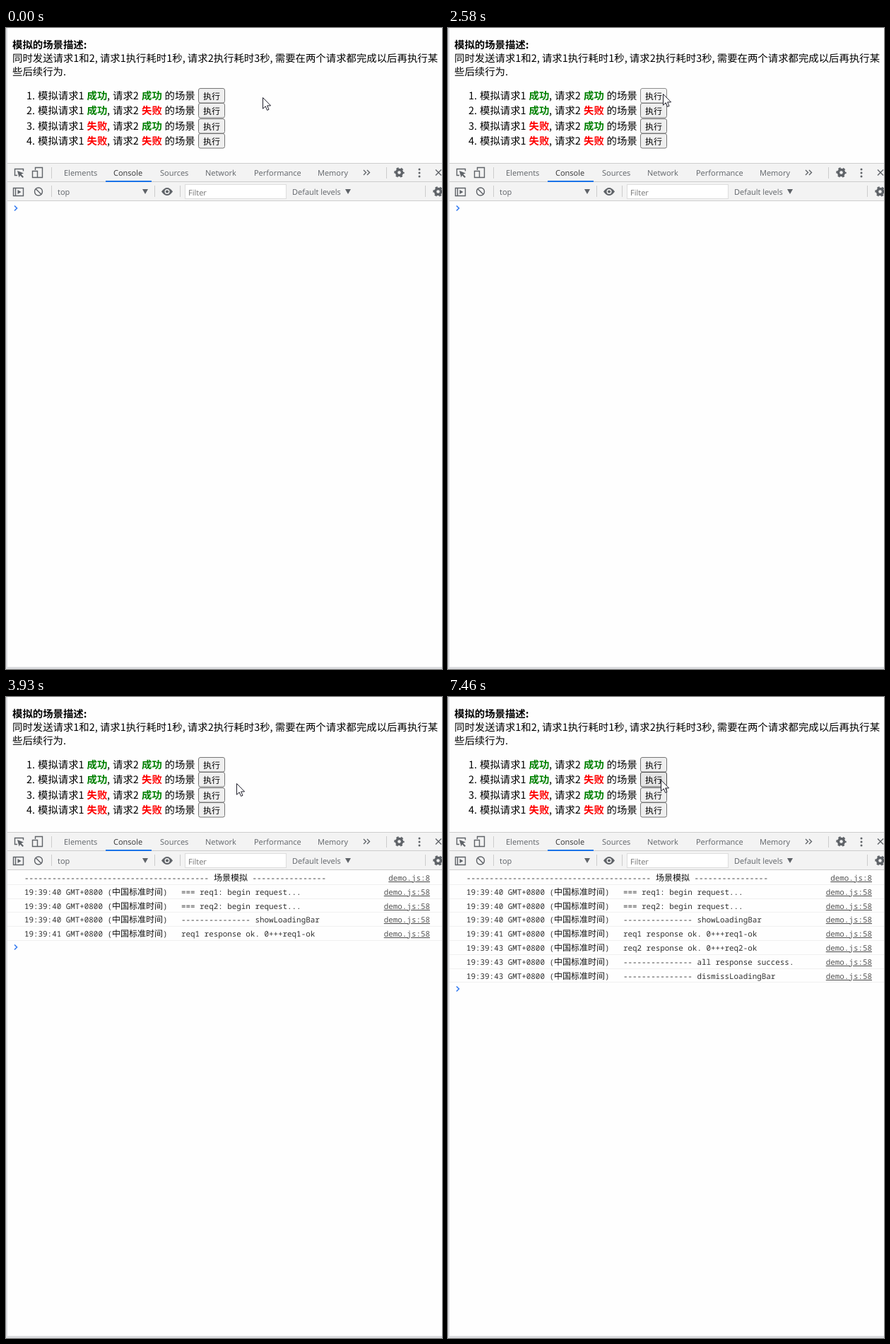
Animation of 617 by 907 pixels, one loop 8000 ms. Source, as an HTML page:

```html
<!DOCTYPE html>
<html lang="zh">
<head>
<meta charset="utf-8">
<style>
  html, body { margin: 0; width: 100%; height: 100%; overflow: hidden; background: #fff; }
  svg { display: block; text-rendering: geometricPrecision; }
  .page { font: 14.4px "Noto Sans CJK SC", "Noto Sans CJK", sans-serif; fill: #000; }
  .bold { font-weight: 700; }
  .ok { font-weight: 700; fill: #008000; }
  .fail { font-weight: 700; fill: #f00; }
  .label { font-size: 12px; }
  .button rect { fill: #efefef; stroke: #767676; }
  .button.hover rect { fill: #e5e5e5; stroke: #4f4f4f; }
  .button.pressed rect { fill: #f5f5f5; stroke: #8d8d8d; }
  .ui { font: 11px "Open Sans", sans-serif; fill: #5f6368; }
  .active { fill: #333; }
  .hint { fill: #757575; }
  .icon { fill: none; stroke: #5f6368; stroke-width: 1.4; }
  .solid { fill: #5f6368; }
  .gear { fill: none; stroke: #5f6368; }
  .log { font: 10.88px "Noto Sans Mono", "DejaVu Sans Mono", monospace; fill: #303030; }
  .cjk { font: 500 12px "Noto Sans CJK SC", "Noto Sans CJK", sans-serif; fill: #111; }
  .link { fill: #545454; text-decoration: underline; text-anchor: end; }
</style>
</head>
<body>
<svg id="stage" width="617" height="907" viewBox="0 0 617 907"></svg>
<script>
const LOOP = 8000, ROW = 19.8, CELL = 6.53;

const text = (x, y, value, cls = '', anchor = 'start') =>
  `<text x="${x}" y="${y}" class="${cls}" text-anchor="${anchor}">${value}</text>`;
const rect = (x, y, w, h, fill) =>
  `<rect x="${x}" y="${y}" width="${w}" height="${h}" fill="${fill}"/>`;
const path = (d, cls = 'icon') => `<path d="${d}" class="${cls}"/>`;
const divider = (x, y) => rect(x, y, 1, 16, '#ccc');
const gear = (x, y) => `<g class="gear" transform="translate(${x} ${y})">
  <circle r="4" stroke-width="3.4"/>
  <circle r="6" stroke-width="2.4" stroke-dasharray="3.2 3.083" stroke-dashoffset="1.6"/></g>`;

function scenario(i) {
  const offset = Math.round(i * 21.25), y = 101 + offset;
  const outcome = (x, good) => text(x, y, good ? '成功' : '失败', good ? 'ok' : 'fail');
  return text(41, y, `${i + 1}.`, '', 'end') + text(45, y, '模拟请求1') +
    outcome(114.5, i < 2) + text(143, y, ',') + text(151, y, '请求2') +
    outcome(192, i % 2 === 0) + text(224.5, y, '的场景') +
    `<g class="button"><rect x="272.5" y="${85.5 + offset}" width="37" height="20.5" rx="2.5"/>
     ${text(279, y - 0.5, '执行', 'label')}</g>`;
}

const page = `<g class="page">
  ${text(9, 29, '模拟的场景描述:', 'bold')}
  ${text(9, 48, '同时发送请求1和2, 请求1执行耗时1秒, 请求2执行耗时3秒, 需要在两个请求都完成以后再执行某')}
  ${text(9, 67, '些后续行为.')}
  ${[0, 1, 2, 3].map(scenario).join('')}</g>`;

const tabs = [[82, 'Elements'], [152, 'Console', 'active'], [218, 'Sources'],
  [282, 'Network'], [351, 'Performance'], [441, 'Memory']];

const toolbar = `
  ${rect(2, 191, 615, 54, '#f3f3f3')}
  ${[191, 217, 244].map(y => rect(2, y, 615, 1, '#cdcdcd')).join('')}
  ${rect(141, 216, 65, 2, '#1a73e8')}
  ${[64, 538].map(x => divider(x, 197)).join('')}
  ${[64, 210, 246, 593].map(x => divider(x, 223)).join('')}
  <rect x="253.5" y="221.5" width="143" height="20" fill="#fff" stroke="#ddd"/>
  <g class="ui">
    ${tabs.map(([x, name, cls]) => text(x, 209, name, cls)).join('')}
    ${text(73, 236, 'top')}${text(258, 237, 'Filter', 'hint')}${text(405, 236, 'Default levels')}
  </g>
  ${path('M16 208.5H12.5V199.5H24.5V202.5')}
  ${path('M16 202L25 205.5L21.5 207L25 210.5L23.5 212L20 208.5L18.5 211.5Z', 'solid')}
  ${path('M41.5 201V197.5H51.5V211.5H45M37.5 202.5H44.5V211.5H37.5Z')}
  ${path('M506 201L509.5 204.5L506 208M511 201L514.5 204.5L511 208')}
  ${path('M608 200.5L616 208.5M616 200.5L608 208.5')}
  ${[200, 205, 210].map(y => `<circle cx="585" cy="${y}" r="1.5" class="solid"/>`).join('')}
  ${gear(556.5, 204.5)}${gear(611.5, 231.5)}
  ${path('M10.5 226.5H24.5V237.5H10.5ZM13.5 226.5V237.5')}
  ${path('M16.5 229L21.5 232L16.5 235Z', 'solid')}
  <circle cx="46" cy="231.5" r="5.5" class="icon"/>${path('M42 227.5L50 235.5')}
  ${path('M193 228H201L197 235ZM480 228H488L484 235Z', 'solid')}
  ${path('M220 231.5Q228 220.5 236 231.5Q228 242.5 220 231.5Z', 'solid')}
  <circle cx="228" cy="231.5" r="2.8" fill="#5f6368" stroke="#f3f3f3" stroke-width="1.4"/>`;

const bar = '-'.repeat(15);
const messages = [
  [2730],
  [2730, 40, '=== req1: begin request...'],
  [2730, 40, '=== req2: begin request...'],
  [2730, 40, `${bar} showLoadingBar`],
  [3810, 41, 'req1 response ok. 0+++req1-ok'],
  [5700, 43, 'req2 response ok. 0+++req2-ok'],
  [5700, 43, `${bar} all response success.`],
  [5700, 43, `${bar} dismissLoadingBar`],
];

function logRow([, second, message], i) {
  const y = Math.round(260 + i * ROW);
  const body = message
    ? text(26, y, `19:39:${second} GMT+0800 (`) + text(150, y, '中国标准时间', 'cjk') +
      text(222, y, ')') + text(248, y, message)
    : text(26, y, '-'.repeat(40)) + text(294, y, '场景模拟', 'cjk') +
      text(342 + CELL, y, '-'.repeat(16));
  return `<g class="row">${body}${text(600, y, `demo.js:${message ? 58 : 8}`, 'link', 'end')}
    ${rect(2, Math.round(245 + (i + 1) * ROW), 615, 1, '#f0f0f0')}</g>`;
}

document.getElementById('stage').innerHTML = `
  ${rect(0, 0, 617, 907, '#fefefe')}
  ${page}${toolbar}
  <g class="log">${messages.map(logRow).join('')}</g>
  <path id="prompt" d="M12 251.5L15.5 255L12 258.5" fill="none" stroke="#367cf1" stroke-width="1.6"/>
  ${rect(0, 0, 2, 907, '#dcdde0')}${rect(0, 904, 617, 3, '#dcdde0')}
  <path id="cursor" d="M.5 .5V16.2L4.2 12.8L6.6 18.4L9 17.3L6.6 11.9H11.6Z"
    fill="#fff" stroke="#20202c" stroke-width="1"/>`;

// Pointer samples: time, x, y, button index, button state
const pointer = [
  [0, 363, 98], [120, 363, 97], [550, 335, 93], [670, 315, 89], [1510, 319, 89],
  [1790, 321, 90], [1910, 311, 92], [2190, 307, 92, 0, 'hover'], [2310, 304, 92, 0, 'hover'],
  [2460, 304, 93, 0, 'hover'], [2580, 304, 93, 0, 'pressed'], [2730, 304, 93, 0, 'hover'],
  [3540, 304, 100, 0, 'hover'], [3690, 310, 107], [3810, 322, 118], [3930, 326, 122],
  [7070, 322, 122], [7220, 314, 120], [7340, 304, 118, 1, 'hover'], [7460, 301, 117, 1, 'hover'],
];
const buttons = document.querySelectorAll('.button');
const rows = document.querySelectorAll('.row');
const prompt = document.getElementById('prompt');
const cursor = document.getElementById('cursor');

function draw(now) {
  const time = now % LOOP;
  const [, x, y, target, state] = pointer.findLast(sample => sample[0] <= time);
  cursor.setAttribute('transform', `translate(${x} ${y})`);
  buttons.forEach((button, i) =>
    button.setAttribute('class', i === target ? `button ${state}` : 'button'));
  const count = messages.filter(([shown]) => shown <= time).length;
  rows.forEach((row, i) => row.setAttribute('visibility', i < count ? 'visible' : 'hidden'));
  prompt.setAttribute('transform', `translate(0 ${Math.round(count * ROW)})`);
}

const start = performance.now();
function tick() {
  draw(performance.now() - start);
  requestAnimationFrame(tick);
}
tick();
</script>
</body>
</html>
```
